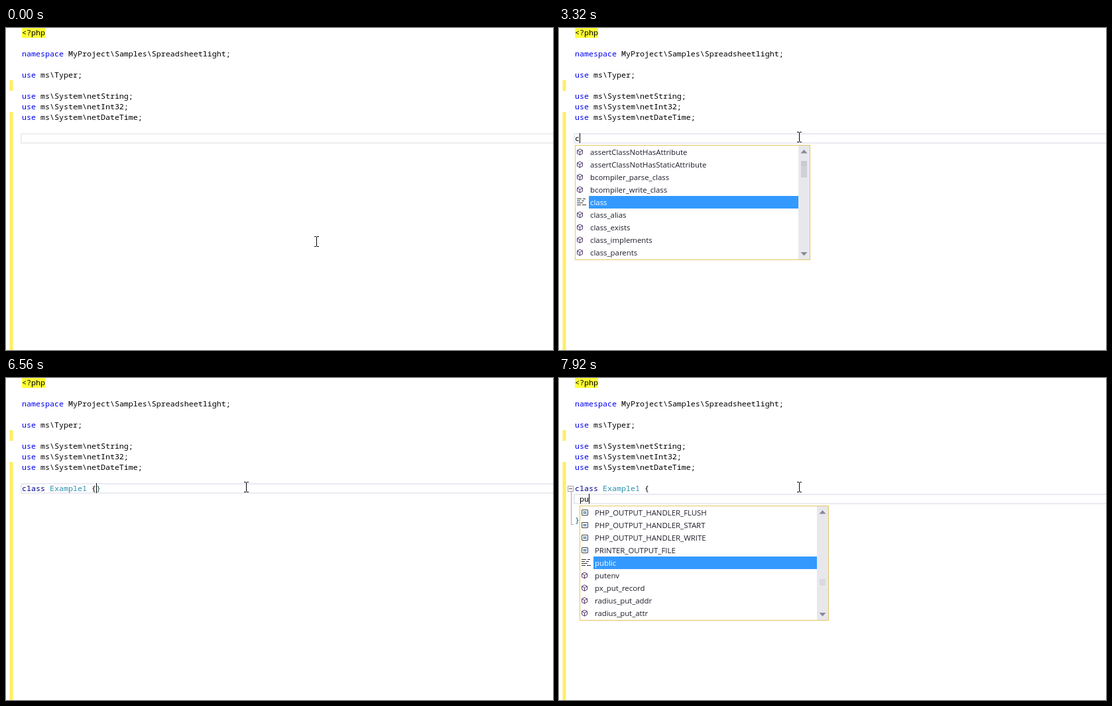
These frames come from a looping animation (825 px wide and 487 px high, 8 s). An HTML page:

```html
<!DOCTYPE html>
<html lang="en">
<head>
<meta charset="utf-8">
<title>Code completion</title>
<style>
  html, body { margin: 0; width: 100%; height: 100%; overflow: hidden; background: #fff; }
  svg { display: block; width: 825px; height: 487px; }
  text { white-space: pre; }
  .code { font: 11.667px "Noto Sans Mono", monospace; }
  .list { font: 11.4px "Open Sans", sans-serif; }
</style>
</head>
<body>
<svg id="stage" viewBox="0 0 825 487"></svg>
<script>
const LOOP = 8000, STEP = 40, LEFT = 24, CHAR = 7, ROW = 16;
const BLUE = '#0000f0', NAVY = '#000090', TEAL = '#2b91af', BRACE = '#1d5c5c', GREEN = '#22a03c';
const stage = document.getElementById('stage');

function add(parent, tag, attrs = {}, content) {
  const el = document.createElementNS('http://www.w3.org/2000/svg', tag);
  set(el, attrs);
  if (content !== undefined) el.textContent = content;
  parent.appendChild(el);
  return el;
}
function set(el, attrs) {
  for (const key in attrs) el.setAttribute(key, attrs[key]);
}
const show = (el, on) => set(el, { visibility: on ? 'visible' : 'hidden' });
const box = (parent, x, y, width, height, fill) => add(parent, 'rect', { x, y, width, height, fill });
const line = (parent, d, stroke, width = 1) =>
  add(parent, 'path', { d, stroke, 'stroke-width': width, fill: 'none' });

const colX = col => LEFT + CHAR * col;
const baseline = row => ROW * row + 11;

// Code line made of [text, colour] parts
function codeLine(row, parts, col = 0) {
  const el = add(stage, 'text', { class: 'code', x: colX(col), y: baseline(row) });
  const spans = parts.map(([s, fill]) => add(el, 'tspan', { fill }, s));
  return { el, spans };
}

// Icons are centred on 0,0
const icons = {
  cube(g) {
    line(g, 'M0-4.5L4-2.4V2.4L0 4.5L-4 2.4V-2.4ZM-4-2.4L0-.2L4-2.4M0-.2V4.5', '#50346a');
  },
  constant(g) {
    add(g, 'rect', { x: -4, y: -4, width: 9, height: 8, rx: .5, fill: '#fff', stroke: '#424242' });
    line(g, 'M-2-1H3M-2 1H3', '#00539c');
  },
  keyword(g) {
    line(g, 'M-4.5-5H2.5M4.5-5H8.5M-4.5-2H.5M2.5-2H6.5M-4.5 1H4.5M-4.5 4H1.5M3.5 4H9.5', '#303030');
  }
};

function popup(x, y, w, items, thumbs) {
  const g = add(stage, 'g', { transform: `translate(${x} ${y})` });
  const h = 174, mid = w - 9.5;
  box(g, 0, 0, w, h, '#fff');
  box(g, w - 18, 1, 17, h - 2, '#e8e8ec');
  box(g, 21, 77, w - 39, 19, '#3399ff');
  for (const [top, height, fill] of thumbs) box(g, w - 14, top, 9, height, fill);
  add(g, 'path', { d: `M${mid - 5} 12.5h10l-5-5.5zM${mid - 5} 162h10l-5 5.5z`, fill: '#868999' });
  items.forEach(([icon, label], i) => {
    const cy = 10.5 + 19 * i;
    icons[icon](add(g, 'g', { transform: `translate(7.5 ${cy})` }));
    add(g, 'text', { class: 'list', x: 23, y: cy + 4, fill: i === 4 ? '#fff' : '#1e1e2a' }, label);
  });
  add(g, 'rect', { x: .5, y: .5, width: w - 1, height: h - 1, fill: 'none', stroke: '#e5c365' });
  return g;
}
const functions = names => names.split(' ').map(name => ['cube', name]);
const constants = names => names.split(' ').map(name => ['constant', name]);

// Static page
box(stage, 0, 0, 825, 487, '#fff');
box(stage, 5.5, 79, 5, 16, '#ffee62');
box(stage, 5.5, 127, 5, 360, '#ffee62');
box(stage, 24, 0, 35, 15, '#ffff37');
const current = add(stage, 'rect', { x: 23, width: 820, height: 14, fill: 'none', 'stroke-width': 2 });
codeLine(0, [['<?php', '#000']]);
codeLine(2, [['namespace', BLUE], [' MyProject\\Samples\\Spreadsheetlight;', '#000']]);
['Typer', '', 'System\\netString', 'System\\netInt32', 'System\\netDateTime'].forEach((name, i) => {
  if (name) codeLine(4 + i, [['use', BLUE], [` ms\\${name};`, '#000']]);
});

// Moving parts
const fold = add(stage, 'g');
line(fold, 'M18.5 172V221.5H22', '#a5a5a5');
add(fold, 'rect', { x: 13.5, y: 163.5, width: 8, height: 8, fill: '#fff', stroke: '#a5a5a5' });
line(fold, 'M15 167.5H20', '#555');

const typed = codeLine(10, [['', '#000'], ['', '#000'], ['', '#000']]);
const member = codeLine(11, [['', '#000']], 1);
const brace = codeLine(10, [['}', BRACE]]);
const caret = box(stage, 0, 0, 1, 15, '#000');

const classList = popup(24, 177, 355, [
  ...functions('assertClassNotHasAttribute assertClassNotHasStaticAttribute bcompiler_parse_class bcompiler_write_class'),
  ['keyword', 'class'],
  ...functions('class_alias class_exists class_implements class_parents')
], [[24, 8, '#c9cad1'], [32, 17, '#d0d1d7']]);
const publicList = popup(31, 193, 376, [
  ...constants('PHP_OUTPUT_HANDLER_FLUSH PHP_OUTPUT_HANDLER_START PHP_OUTPUT_HANDLER_WRITE PRINTER_OUTPUT_FILE'),
  ['keyword', 'public'],
  ...functions('putenv px_put_record radius_put_addr radius_put_attr')
], [[111, 10, '#d9d9df']]);

const pointer = add(stage, 'g');
line(pointer, 'M-3-7.5H0M1-7.5H4M.5-7V7M-3 7.5H0M1 7.5H4', '#000');

// Timeline
const DECL = 'class Example1 {';
const KEYS = [3280, 3520, 3600, 3640, 3720, 3800, 3960, 4160, 4880, 4960, 5040, 5120, 5200, 5600, 5880, 6080];
const LINE_ROWS = [[0, 10], [6680, 11], [6760, 12], [6920, 13], [6960, 12], [7240, 11]];
const BRACE_ROWS = [[6120, 10], [6680, 11], [6760, 12], [6920, 13]];
const MEMBER_COLS = [[0, 0], [7520, 1], [7840, 2], [7920, 3]];
const at = (track, t) => track.reduce((value, [time, next]) => t >= time ? next : value, null);

function pointerAt(t) {
  if (t < 2320) return [468, 323];
  const p = Math.min(1, (t - 2320) / 520);
  const ease = p * p * (3 - 2 * p);
  return [Math.round(379 - 17 * ease), Math.round(342 - 177 * ease)];
}

function draw(ms) {
  const t = Math.floor((ms % LOOP) / STEP) * STEP;
  const count = KEYS.filter(key => t >= key).length;
  const text = DECL.slice(0, count);
  const row = at(LINE_ROWS, t);
  const memberCol = at(MEMBER_COLS, t);

  [text.slice(0, 5), text.slice(5, 14), text.slice(14)].forEach((s, i) => {
    typed.spans[i].textContent = s;
  });
  set(typed.spans[0], { fill: count >= 5 ? NAVY : '#000' });
  set(typed.spans[1], { fill: t >= 6440 ? TEAL : '#000' });
  member.spans[0].textContent = 'pu'.slice(0, Math.max(0, memberCol - 1));

  const braceRow = at(BRACE_ROWS, t);
  show(brace.el, braceRow !== null);
  if (braceRow) set(brace.el, { x: colX(braceRow === 10 ? 16 : 0), y: baseline(braceRow) });

  set(current, { y: ROW * row, stroke: t < 2920 ? '#eeeeee' : '#eaeaf2' });
  set(caret, {
    x: colX(row === 10 ? count : memberCol),
    y: ROW * row - 1,
    fill: row === 12 ? GREEN : '#000'
  });
  show(caret, t >= 2920);
  show(fold, t >= 7360);
  show(classList, t >= 3320 && t < 3800);
  show(publicList, t >= 7880);

  const [x, y] = pointerAt(t);
  set(pointer, { transform: `translate(${x} ${y})` });
}

const start = performance.now();
function tick() {
  draw(performance.now() - start);
  requestAnimationFrame(tick);
}
draw(0);
tick();
</script>
</body>
</html>
```
